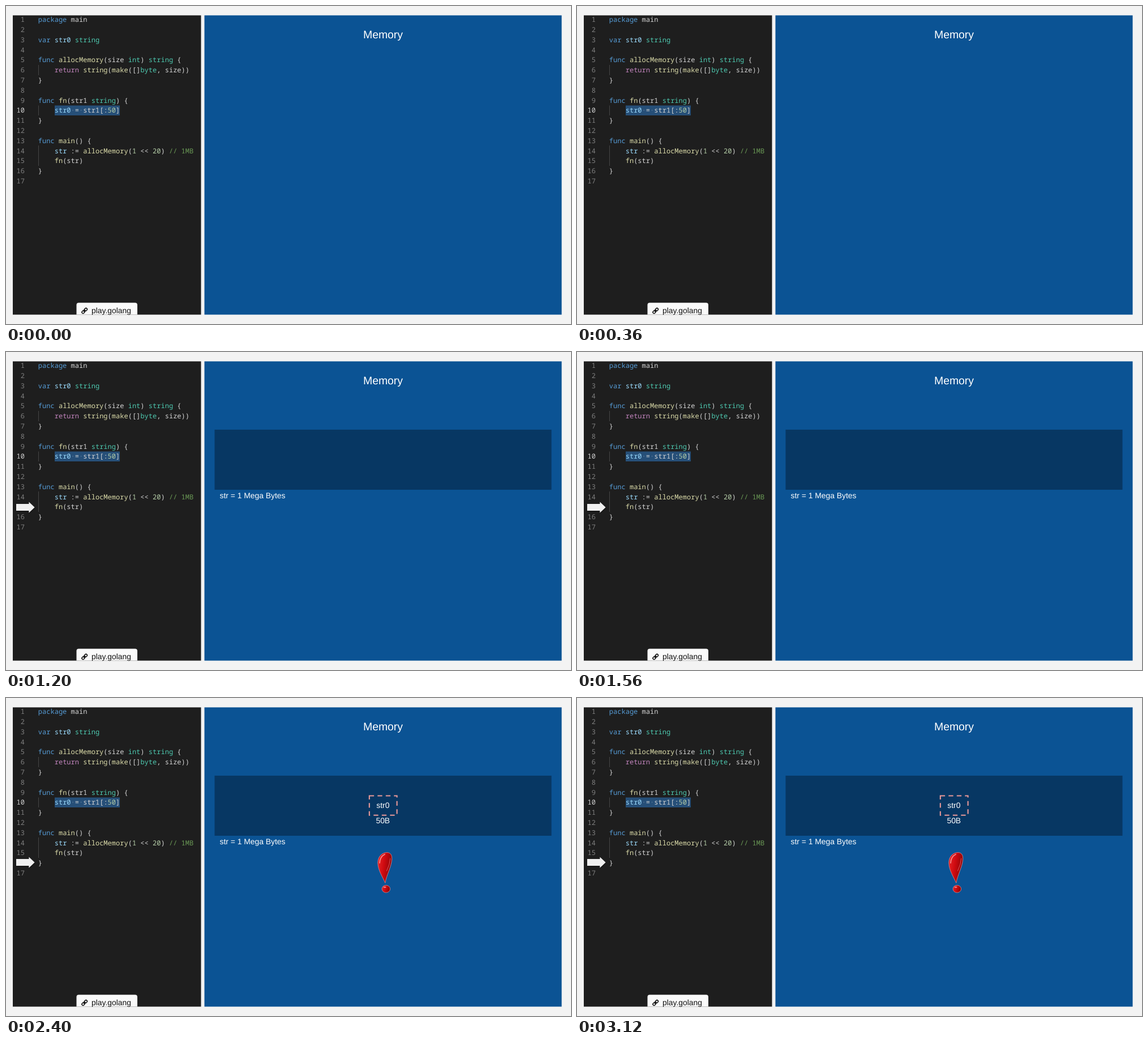
An HTML page for the animation above (3600 ms loop, 998 by 561 pixels).

```html
<!DOCTYPE html>
<html lang="en">
<head>
<meta charset="utf-8">
<title>Memory</title>
<style>
  html, body { margin: 0; width: 100%; height: 100%; overflow: hidden; background: #f3f3f3; }
  svg { display: block; width: 998px; height: 561px; }
  text { white-space: pre; text-rendering: geometricPrecision; }
  #code { font: 12.04px "Noto Sans Mono", "DejaVu Sans Mono", monospace; fill: #d4d4d4; }
  .num { fill: #7f7f7f; text-anchor: end; }
  .label { font: 13.86px "Liberation Sans", Arial, sans-serif; fill: #fff; }
  .mid { text-anchor: middle; }
  .title { font-size: 19.4px; }
</style>
</head>
<body>
<svg viewBox="0 0 998 561">
  <defs>
    <linearGradient id="red" x1="0" x2="1" y2=".25">
      <stop offset="0" stop-color="#e8262a"/>
      <stop offset=".5" stop-color="#cf0a10"/>
      <stop offset="1" stop-color="#8f0508"/>
    </linearGradient>
    <filter id="shade" x="-20%" y="-30%" width="150%" height="180%">
      <feDropShadow dx="0.5" dy="1" stdDeviation="0.8" flood-opacity=".6"/>
    </filter>
  </defs>

  <path d="M12 16.5H344.5V544.5H12z" fill="#1e1e1e"/>
  <path d="M350.5 16.5H981.5V544.5H350.5z" fill="#0b5394"/>
  <path d="M86 175.5H201V193H86z" fill="#264f78"/>
  <path d="M57.5 104V122M57.5 175.5V193M57.5 246V282" stroke="#454545"/>
  <g id="code"></g>

  <path d="M124.5 544.5V527.5q0-4 4-4H228q4 0 4 4V544.5z" fill="#fafafa"/>
  <g transform="translate(138.7 537.7) rotate(-45)" fill="none" stroke="#111" stroke-width="1.5">
    <rect x="-5.8" y="-2.1" width="5.6" height="4.2" rx="2.1"/>
    <rect x="0.2" y="-2.1" width="5.6" height="4.2" rx="2.1"/>
    <path d="M-2.4 0H2.4"/>
  </g>
  <text class="label" x="151" y="542" style="fill:#111">play.golang</text>
  <text class="label mid title" x="666" y="56.5">Memory</text>

  <g id="block">
    <path d="M368.5 137H963.5V243H368.5z" fill="#073763"/>
    <text class="label" x="377.5" y="257.5">str = 1 Mega Bytes</text>
  </g>
  <g id="slice">
    <path id="dash" d="M641.8 172.5H690.6V206.7H641.8z" fill="none"/>
    <text class="label mid" x="665.8" y="194.2">str0</text>
    <text class="label mid" x="665.8" y="220.8">50B</text>
  </g>
  <g id="alert">
    <g fill="url(#red)" stroke="#d98a8e" stroke-width=".8">
      <path d="M669.8 326.3C665.5 316 657 304 656.8 291C656.7 279 665 272.6 673 272.6C679.5 272.6 682.2 277.5 681.6 285C680.6 298 672.3 312 669.8 326.3z"/>
      <ellipse cx="671.3" cy="336.8" rx="7.3" ry="6.5"/>
    </g>
    <path d="M660 291Q660.5 280 669 275.8" fill="none" stroke="#f58a8a" stroke-width="1.8" stroke-linecap="round"/>
    <path d="M678.8 283Q678 294 672.5 305" fill="none" stroke="#e0555a" stroke-linecap="round"/>
    <ellipse cx="669" cy="333.8" rx="2.6" ry="1.3" fill="#f07c7c"/>
  </g>
  <path id="arrow" d="M18-6H40.5V-9.5L50.5 0L40.5 9.5V6H18z" fill="#f0f0f0" filter="url(#shade)"/>
</svg>
<script>
const $ = id => document.getElementById(id);

const source = `package main

var str0 string

func allocMemory(size int) string {
    return string(make([]byte, size))
}

func fn(str1 string) {
    str0·=·str1[:50]
}

func main() {
    str := allocMemory(1 << 20) // 1MB
    fn(str)
}
`;

const rules = [
  ['#6a9955', /\/\/.*/],
  ['#569cd6', /\b(?:package|var|func)\b/],
  ['#c586c0', /\breturn\b/],
  ['#dcdcaa', /\w+(?=\()/],
  ['#4ec9b0', /\b(?:string|int|byte)\b/],
  ['#9cdcfe', /\bstr0|\bstr(?= :=)/],
  ['#b5cea8', /\b\d+/],
  ['#5f7f9c', /·/]
];
const lexer = new RegExp(rules.map(r => `(${r[1].source})`).join('|'), 'g');
const escape = s => s.replace(/</g, '&lt;');

function paint(line) {
  let html = '', last = 0;
  for (const m of line.matchAll(lexer)) {
    const color = rules[m.slice(1).findIndex(Boolean)][0];
    html += escape(line.slice(last, m.index)) + `<tspan fill="${color}">${escape(m[0])}</tspan>`;
    last = m.index + m[0].length;
  }
  return html + escape(line.slice(last));
}

$('code').innerHTML = source.split('\n').map((line, i) => {
  const y = 28.3 + i * 17.79;
  const active = i === 9 ? ' style="fill:#d0d0d0"' : '';
  return `<text class="num" x="33" y="${y}"${active}>${i + 1}</text><text x="56.8" y="${y}">${paint(line)}</text>`;
}).join('');

const arrowY = [0, 255, 274, 184, 290];
const show = (id, on) => $(id).setAttribute('visibility', on ? 'visible' : 'hidden');

function draw(now) {
  const step = Math.min(4, Math.floor(now % 3600 / 600));
  show('arrow', step > 0);
  show('block', step > 0);
  show('slice', step > 2);
  show('alert', step > 3);
  $('arrow').setAttribute('transform', `translate(0 ${arrowY[step]})`);
  const [color, width, dashes] = step > 3 ? ['#ea9999', 2.1, '8.3 6.2'] : ['#fff', 1.4, '5.5 4.2'];
  $('dash').setAttribute('stroke', color);
  $('dash').setAttribute('stroke-width', width);
  $('dash').setAttribute('stroke-dasharray', dashes);
}

const start = performance.now();
function tick() {
  draw(performance.now() - start);
  requestAnimationFrame(tick);
}
tick();
</script>
</body>
</html>
```
